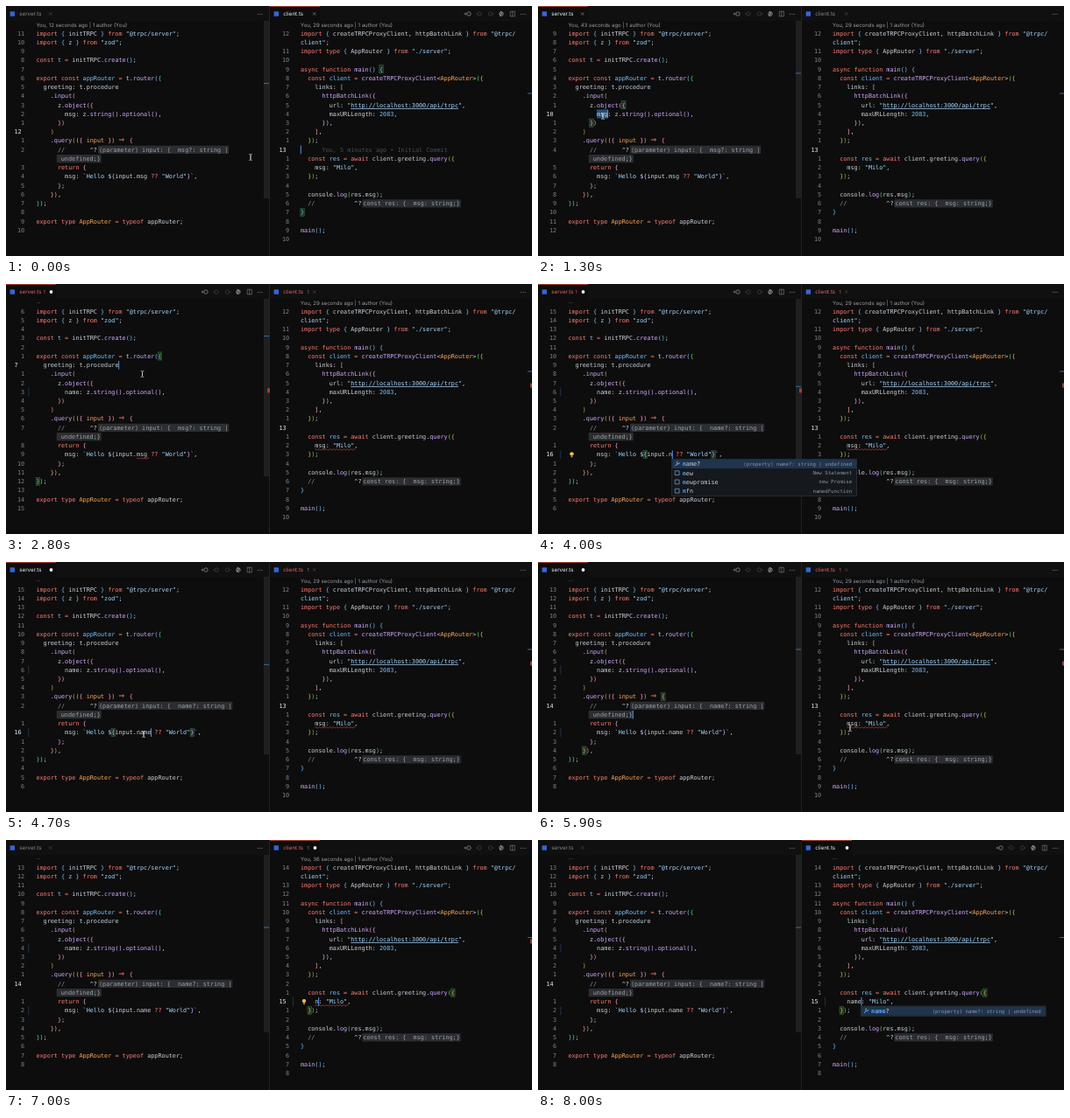
Recreate the animation shown at these times as an HTML page. Size 600 by 286 pixels, loop 8.1 s.

```html
<!DOCTYPE html>
<html lang="en">
<head>
<meta charset="utf-8">
<title>Type-safe rename</title>
<style>
  html, body { margin: 0; width: 100%; height: 100%; overflow: hidden; background: #0d0d0d; }
  svg { display: block; width: 600px; height: 286px; }
  text { white-space: pre; text-rendering: geometricPrecision; font: 6.81px "DejaVu Sans Mono", monospace; fill: #c9d1d9; }
  .ui { font: 6.2px Inter, sans-serif; }
  .lens { font: 6.05px Inter, sans-serif; fill: #999da3; }
  .small { font-size: 5.73px; fill: #8b949e; }
</style>
</head>
<body>
<svg id="stage" viewBox="0 0 600 286"></svg>
<script>
const LOOP = 8100, CW = 4.09, LH = 10.24, TOP = 31.3;
const BRACKETS = ["#79c0ff", "#56d364", "#e3b341", "#ffa198", "#ff9bce", "#d2a8ff"];
const RULES = [
  ["#a5d6ff", /^client"|"[^"]*"?|`(?:Hello )?|\$/],
  ["#8b949e", /\/\//],
  ["#ff7b72", /\b(?:import|from|export|const|type|typeof|async|function|return|await)\b|=>|=|\?\?/],
  ["#ffa657", /AppRouter(?= =|>)|input(?= \})/],
  ["#d2a8ff", /\w+(?=[(<])/],
  ["#79c0ff", /(?<=const )\w+|\d+/],
  ["bracket", /[(){}[\]]/],
  ["#c9d1d9", /\w+|[^\s\w]/]
];
const TOKEN = new RegExp(RULES.map(r => `(${r[1].source})`).join("|"), "g");

const esc = s => s.replace(/&/g, "&amp;").replace(/</g, "&lt;");
const rowY = row => TOP + row * LH;
const rect = (x, y, w, h, fill, more = "") =>
  `<rect x="${x}" y="${y}" width="${w}" height="${h}" fill="${fill}" ${more}/>`;
const text = (x, y, s, more = "") => `<text x="${x}" y="${y}" ${more}>${esc(s)}</text>`;
const path = (d, stroke, w = 0.8) =>
  `<path d="${d}" fill="none" stroke="${stroke}" stroke-width="${w}"/>`;

function serverCode(key, prop) {
  return [
    'import { initTRPC } from "@trpc/server";',
    'import { z } from "zod";',
    '',
    'const t = initTRPC.create();',
    '',
    'export const appRouter = t.router({',
    '  greeting: t.procedure',
    '    .input(',
    '      z.object({',
    `        ${key}: z.string().optional(),`,
    '      })',
    '    )',
    '    .query(({ input }) => {',
    '      //       ^?',
    '',
    '      return {',
    '        msg: `Hello ${input.' + prop + ' ?? "World"}`,',
    '      };',
    '    }),',
    '});',
    '',
    'export type AppRouter = typeof appRouter;',
    ''
  ];
}

function clientCode(key) {
  return [
    'import { createTRPCProxyClient, httpBatchLink } from "@trpc/',
    'client";',
    'import type { AppRouter } from "./server";',
    '',
    'async function main() {',
    '  const client = createTRPCProxyClient<AppRouter>({',
    '    links: [',
    '      httpBatchLink({',
    '        url: "http://localhost:3000/api/trpc",',
    '        maxURLLength: 2083,',
    '      }),',
    '    ],',
    '  });',
    '',
    '  const res = await client.greeting.query({',
    `    ${key}: "Milo",`,
    '  });',
    '',
    '  console.log(res.msg);',
    '  //           ^?',
    '}',
    '',
    'main();',
    ''
  ];
}

function highlight(lines, x0) {
  let depth = 0;
  return lines.map((line, row) => {
    let spans = "";
    for (const m of line.matchAll(TOKEN)) {
      const s = m[0];
      let fill = RULES[m.slice(1).findIndex(g => g !== undefined)][0];
      if (fill === "bracket") {
        const open = "({[".includes(s);
        if (!open) depth--;
        fill = BRACKETS[Math.max(depth, 0) % 6];
        if (open) depth++;
      }
      const arrow = s === "=>";
      spans += `<tspan x="${(x0 + m.index * CW).toFixed(2)}" fill="${fill}"${arrow ? ' font-size="11"' : ""}>` +
        `${arrow ? "⇒" : esc(s)}</tspan>`;
    }
    return `<text y="${(rowY(row) + 2.3).toFixed(2)}">${spans}</text>`;
  }).join("");
}

// Relative line numbers; the wrapped row carries none.
function gutter(lines, left, current, wrap) {
  const number = row => row < wrap ? row + 1 : row;
  return lines.map((_, row) => {
    if (row === wrap) return "";
    const y = rowY(row) + 2.3;
    return row === current
      ? text(left + 9.5, y, String(number(row)), 'style="fill:#e6edf3"')
      : text(left + 21.2, y, String(Math.abs(number(row) - number(current))), 'text-anchor="end" style="fill:#7d838b"');
  }).join("");
}

function bracketPair(lines, x0, [open, close]) {
  const box = (row, ch) => rect(x0 + lines[row].lastIndexOf(ch) * CW - 0.2, rowY(row) - 4.6, 4.5, 9.2,
    "#1a3320", 'stroke="#3b6b45" stroke-width=".5"');
  return box(open, "{") + box(close, "}");
}

function hint(x, row, s) {
  return rect(x, rowY(row) - 4.6, s.length * CW + 2, 9.2, "#2b2d30", 'rx="1"') +
    text(x + 1, rowY(row) + 2.3, s, 'style="fill:#9da2a8"');
}

function squiggle(x, row, chars) {
  let d = `M${x} ${rowY(row) + 4.4}`;
  for (let i = 0; i < chars * CW / 2; i++) d += `l1 ${i % 2 ? 0.6 : -0.6}l1 ${i % 2 ? -0.6 : 0.6}`;
  return path(d, "#d04444", 0.7);
}

const caret = (x, row) => rect(x - 0.2, rowY(row) - 4.8, 0.9, 9.6, "#58a6ff");
const select = (x, row) => rect(x, rowY(row) - 5, 3 * CW, 10, "#264f78");
const edited = (x, row) => rect(x, rowY(row) - 5, 0.7, 10, "#24435c");
const bulb = (x, row) => `<circle cx="${x}" cy="${rowY(row) - 0.8}" r="2.2" fill="#f5b860"/>` +
  rect(x - 1, rowY(row) + 1.5, 2, 1.6, "#d29a4a");

// Overview ruler: a row's place on the whole file.
const rulerY = row => 25 + row * 5.77;
const cursorMark = (x, row) => rect(x, rulerY(row) - 0.5, 6, 1, "#2f6fb5");
const errorMark = (x, row) => rect(x, rulerY(row) + 2, 3, 5, "#a33b36");

function tab(x, name, focused, error, dirty) {
  const fill = error ? "#f0645c" : focused ? "#f0f3f6" : "#858a91";
  const mark = dirty
    ? `<circle cx="${x + 51.5}" cy="9" r="1.9" fill="#e6edf3"/>`
    : path(`M${x + 49} 7.2l3.4 3.4m0-3.4l-3.4 3.4`, focused ? "#999" : "#555", 0.6);
  return (focused ? rect(x, 0, 57, 17, "#0d0d0d") + rect(x, 0, 57, 0.9, "#b04636") : "") +
    rect(x + 4.6, 6.3, 5.4, 5.4, "#3565d8") +
    text(x + 15.3, 11.2, name, `class="ui" style="fill:${fill}"`) +
    (error ? text(x + 42.5, 11, "1", `class="ui" style="fill:${fill};font-size:5.4px"`) : "") + mark;
}

function actions(right, focused) {
  const ring = (x, c) => `<circle cx="${x}" cy="9" r="2.2" fill="none" stroke="${c}" stroke-width=".7"/>`;
  let s = [0, 1, 2].map(i => `<circle cx="${right - 13.4 + i * 2.3}" cy="9.2" r=".55" fill="#999"/>`).join("");
  if (!focused) return s;
  const x = right - 74;
  s += ring(x + 1, "#999") + path(`M${x - 4} 9h3m-1.5-1.5l-1.5 1.5l1.5 1.5`, "#999", 0.6);
  s += ring(x + 13, "#444") + ring(x + 25.5, "#444") + path(`M${x + 9} 9h2m17 0h2`, "#444", 0.6);
  s += ring(x + 38, "#bbb") + path(`M${x + 37} 5.8l2 3.2h-2v3`, "#bbb", 0.7);
  s += path(`M${x + 48.2} 6.2h5.2v5.6h-5.2zM${x + 50.8} 6.2v5.6`, "#999", 0.5);
  return s;
}

function lens(x, seconds) {
  return seconds ? text(x, 24.2, `You, ${seconds} seconds ago | 1 author (You)`, 'class="lens"')
    : text(x, 21.5, "…", 'class="lens"');
}

const ICONS = {
  word: (x, y) => path(`M${x - 2.5} ${y - 2}h4m-4 2h5m-5 2h3.5`, "#b6bcc4", 0.8),
  ref: (x, y) => text(x - 3.2, y + 1.8, "[ø]", 'style="font-size:4.4px;fill:#d2a8ff"'),
  field: (x, y) => path(`M${x - 2.2} ${y + 2.2}l2.6-2.6m2.2-1.4a1.5 1.5 0 1 1-1.8-1.2`, "#79b8ff", 1),
  snippet: (x, y) => path(`M${x - 2.4} ${y - 2.4}h4.8v4.8h-4.8z`, "#79a6e0", 0.7)
};

// Items are [icon, label with [matched] parts, detail, struck out].
function popup(x, row, items) {
  const y = rowY(row) + 5.1;
  let s = rect(x, y, 211, items.length * LH + 1.4, "#15181d", 'stroke="#343a42" stroke-width=".6"') +
    rect(x + 0.4, y + 0.5, 210.2, LH, "#20344d");
  items.forEach(([icon, label, detail = "", struck], i) => {
    const cy = y + 0.6 + (i + 0.5) * LH;
    const spans = label.replace(/\[(\w+)\]/g, '<tspan fill="#58a6ff" font-weight="bold">$1</tspan>');
    s += ICONS[icon](x + 6, cy) +
      `<text x="${x + 12}" y="${cy + 2.3}"${struck ? ' text-decoration="line-through"' : ""}>${spans}</text>` +
      text(x + 205.5, cy + 2, detail, 'class="small" text-anchor="end"');
  });
  return s;
}

const PROPERTY = "(property) name?: string | undefined";
const KEY_ITEMS = [
  ["word", "[nam]espace", "namespace"],
  ["ref", "[nam]e", "", true],
  ["ref", "[Nam]edNodeMap"],
  ["ref", "[Na]vigationPreload[M]anager"],
  ["ref", "Performance[Na]vigationTi[m]ing"]
];
const PROP_ITEMS = [
  ["field", "[n]ame?", PROPERTY],
  ["snippet", "[n]ew", "New Statement"],
  ["snippet", "[n]ewpromise", "new Promise"],
  ["snippet", "[n]fn", "namedFunction"]
];

// Pointer strokes: start, end, from, to; it rests between strokes.
const MOVES = [
  [100, 900, 279, 173, 74, 126],
  [2300, 2700, 74, 126, 155.5, 103],
  [2900, 3400, 155.5, 103, 157, 197],
  [4700, 5200, 157, 197, 115, 178],
  [5400, 5900, 115, 178, 356, 190]
];

function pointer(t) {
  let [, , x, y] = MOVES[0];
  for (const [a, b, x0, y0, x1, y1] of MOVES) {
    if (t < a) break;
    const p = Math.min(1, (t - a) / (b - a)), e = p * p * (3 - 2 * p);
    x = x0 + (x1 - x0) * e;
    y = y0 + (y1 - y0) * e;
  }
  return path(`M${x - 1.8} ${y - 3.5}q1.8 0 1.8 1v5q0 1-1.8 1M${x + 1.8} ${y - 3.5}q-1.8 0-1.8 1v5q0 1 1.8 1`, "#d8d8d8", 0.7);
}

function scene(t) {
  const during = (a, b) => t >= a && t < b;
  const typed = times => t < times[0] ? "msg" : "name".slice(0, times.filter(k => k <= t).length);
  const key = typed([1800, 1900, 2100, 2300]);
  const prop = typed([3900, 4300, 4300, 4300]);
  const resKey = typed([7000, 7300, 7500, 7700]);
  const inServer = during(1000, 6400);
  const serverRow = t < 1000 ? 11 : t < 2600 ? 9 : t < 3500 ? 6 : t < 5300 ? 16 : 13;
  const clientRow = t < 6400 ? 13 : 15;
  const serverError = during(2500, 4500), clientError = during(2500, 7900);
  const L = 34.4, R = 336;
  const server = serverCode(key, prop), client = clientCode(resKey);
  const keyX = L + 8 * CW, propX = L + 28 * CW, resX = R + 4 * CW;

  let s = rect(0, 0, 600, 286, "#0d0d0d") + rect(0, 0, 600, 17, "#101010");
  s += tab(0, "server.ts", inServer, serverError, during(1800, 6400));
  s += tab(301, "client.ts", !inServer, clientError, t >= 7000);
  s += actions(301, inServer) + actions(601, !inServer);
  s += rect(294, 17, 6, 203, "#1f1f1f") + rect(300, 0, 1, 286, "#232323");
  s += cursorMark(294, serverRow) + cursorMark(595, clientRow);
  if (serverError) s += errorMark(298, 16);
  if (clientError) s += errorMark(598, 15);
  s += lens(L, t < 1000 ? 12 : t < 2500 ? 43 : 0) + lens(R, t < 6400 ? 29 : t < 7700 ? 36 : 0);
  s += gutter(server, 0, serverRow, 14) + gutter(client, 302, clientRow, 1);
  if (t >= 1800) s += edited(25.5, 9);
  if (t >= 3900) s += edited(25.5, 16);
  if (t >= 7000) s += edited(327, 15);

  if (inServer) {
    s += bracketPair(server, L, { 9: [8, 10], 6: [5, 19], 16: [16, 16], 13: [12, 18] }[serverRow]);
  } else {
    s += bracketPair(client, R, clientRow === 13 ? [4, 20] : [14, 16]);
  }
  if (during(1300, 1800)) s += select(keyX, 9);
  if (during(3600, 3900)) s += select(propX, 16);
  if (during(6600, 7000)) s += select(resX, 15);

  s += highlight(server, L) + highlight(client, R);
  s += rect(R + 14 * CW, rowY(8) + 4, 30 * CW, 0.7, "#a5d6ff");
  s += hint(105, 13, `(parameter) input: {  ${t < 3300 ? "msg" : "name"}?: string |`);
  s += hint(57.7, 14, " undefined;}");
  s += hint(406.3, 19, "const res: {  msg: string;}");
  if (t < 1000) {
    s += text(R + 6 * CW, rowY(13) + 2.3, "You, 5 minutes ago • Initial Commit", 'style="fill:#484c52"');
    s += caret(R, 13);
  }
  if (during(2500, 3900)) s += squiggle(propX, 16, 3);
  if (clientError) s += squiggle(resX, 15, resKey.length + 8);

  if (inServer) {
    if (serverRow === 9) s += caret(keyX + key.length * CW, 9);
    if (serverRow === 6) s += caret(L + 23 * CW, 6);
    if (serverRow === 16) s += caret(propX + prop.length * CW, 16);
    if (serverRow === 13) s += caret(108, 14);
  } else if (t >= 6400) s += caret(resX + resKey.length * CW, 15);

  if (during(1500, 2500)) s += bulb(38.5, 9);
  if (during(3800, 4500)) s += bulb(38.5, 16);
  if (during(6800, 7600)) s += bulb(340, 15);
  if (during(1900, 2300)) s += popup(keyX + key.length * CW - 0.5, 9, KEY_ITEMS);
  if (during(3900, 4300)) s += popup(propX + prop.length * CW - 0.3, 16, PROP_ITEMS);
  if (t >= 7400) s += popup(resX + resKey.length * CW - 0.6, 15, [["field", `[${resKey}]${"name".slice(resKey.length)}?`, PROPERTY]]);

  if (t < 1800 || during(2300, 3900) || during(4700, 7000)) s += pointer(t);
  return s;
}

const stage = document.getElementById("stage");
let shown = -1;
function tick() {
  const t = Math.floor(performance.now() % LOOP / 100) * 100;
  if (t !== shown) stage.innerHTML = scene(shown = t);
  requestAnimationFrame(tick);
}
tick();
</script>
</body>
</html>
```
